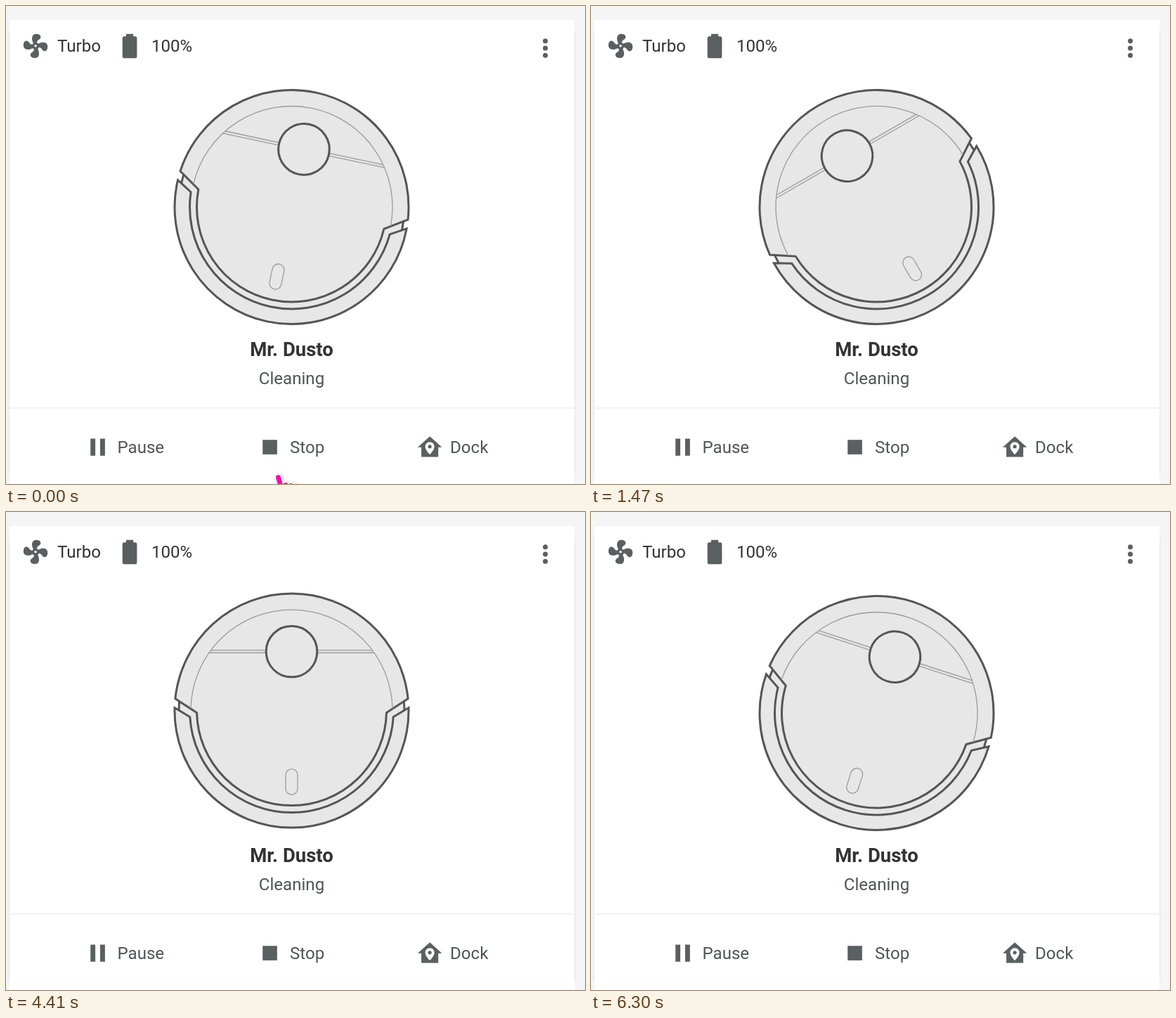
An HTML page that plays this animation: 824x680 px, repeating every 6.37 s.

```html
<!DOCTYPE html>
<html lang="en">
<head>
<meta charset="utf-8">
<title>Vacuum card</title>
<style>
  html, body { margin: 0; width: 100%; height: 100%; overflow: hidden; background: #f5f5f5; }
  svg { display: block; width: 824px; height: 680px; }
  text { font: 24.08px Roboto, sans-serif; fill: #505456; }
  .head { fill: #333; }
  .name { font-size: 27.5px; font-weight: 700; fill: #333; }
  .mid { text-anchor: middle; }
  .icon { fill: #5a5f61; fill-rule: evenodd; }
  .bold { fill: #e7e7e7; stroke: #555; stroke-width: 3; }
  .thin { fill: none; stroke: #9b9b9b; stroke-width: 1.3; }
</style>
</head>
<body>
<svg viewBox="0 0 824 680">
  <defs>
    <linearGradient id="edgeL"><stop offset="0" stop-color="#f5f5f5"/><stop offset="1" stop-color="#e9e9e9"/></linearGradient>
    <linearGradient id="edgeR"><stop offset="0" stop-color="#e9e9e9"/><stop offset="1" stop-color="#f5f5f5"/></linearGradient>
    <path id="blade" d="M12.5 2C17 2 17.11 5.57 14.75 6.75C13.76 7.24 13.32 8.29 13.13 9.22L12 12L10.14 9.65C8.15 5.96 8.94 2 12.5 2Z"/>
  </defs>

  <rect width="824" height="680" fill="#f5f5f5"/>
  <rect x="2" y="36" width="3" height="630" fill="url(#edgeL)"/>
  <rect x="809" y="36" width="3" height="630" fill="url(#edgeR)"/>
  <rect x="5" y="20" width="804" height="660" fill="#fff"/>
  <rect x="5" y="571.2" width="804" height="1.6" fill="#eee"/>

  <g class="icon" transform="translate(21.4 36.2) scale(1.72)">
    <use href="#blade"/>
    <use href="#blade" transform="rotate(90 12 12)"/>
    <use href="#blade" transform="rotate(180 12 12)"/>
    <use href="#blade" transform="rotate(270 12 12)"/>
    <circle cx="12" cy="12" r="3"/>
    <circle cx="12" cy="12" r="1" fill="#fff"/>
  </g>
  <path class="icon" transform="translate(155.4 36.4) scale(1.72)"
    d="M16.67 4H15V2H9V4H7.33A1.33 1.33 0 0 0 6 5.33V20.67C6 21.4 6.6 22 7.33 22H16.67A1.33 1.33 0 0 0 18 20.67V5.33C18 4.6 17.4 4 16.67 4Z"/>
  <text class="head" x="73" y="65">Turbo</text>
  <text class="head" x="207" y="65">100%</text>
  <g class="icon">
    <circle cx="767.5" cy="49.7" r="3.5"/>
    <circle cx="767.5" cy="60" r="3.5"/>
    <circle cx="767.5" cy="70.3" r="3.5"/>
  </g>

  <g id="robot"></g>

  <text class="name mid" x="406.5" y="498">Mr. Dusto</text>
  <text class="mid" x="406.5" y="537.5">Cleaning</text>

  <path class="icon" transform="translate(109.9 607) scale(1.72)" d="M6 5H10V19H6ZM14 5H18V19H14Z"/>
  <text x="158.5" y="636">Pause</text>
  <path class="icon" transform="translate(354.9 606.9) scale(1.72)" d="M6 6H18V18H6Z"/>
  <text x="404" y="636">Stop</text>
  <path class="icon" transform="translate(582.5 607) scale(1.72)"
    d="M12 3L2 12H5V20H19V12H22ZM12 7.7C14.1 7.7 15.8 9.4 15.8 11.5C15.8 14.5 12 18 12 18C12 18 8.2 14.5 8.2 11.5C8.2 9.4 9.9 7.7 12 7.7M12 10A1.5 1.5 0 0 0 12 13A1.5 1.5 0 0 0 12 10Z"/>
  <text x="632" y="636">Dock</text>

  <g id="hand" fill="none" stroke-linecap="round" stroke-linejoin="round">
    <path d="M388 671L393 688M398.5 682V690M406 683V690M413 685V690" stroke="#d4d4d4" stroke-width="13"/>
    <path d="M387.5 670.5L392.5 688M398 681.5V690M405.5 682.5V690M412.5 685V690" stroke="#fff" stroke-width="11"/>
    <path d="M387.5 670.5L392.5 688M398 681.5V690M405.5 682.5V690M412.5 685V690" stroke="#f60da8" stroke-width="7"/>
  </g>
</svg>
<script>
const STEP = 70, FRAMES = 91;
const CX = 406.5, CY = 286;
const robot = document.getElementById("robot");
const hand = document.getElementById("hand");

// Arc between the two points of a circle of radius r at height y.
const halfX = (r, y) => Math.sqrt(r * r - y * y);
const arc = (r, y, dir, sweep) => `A${r} ${r} 0 ${sweep === (dir * y > 0 ? 1 : 0) ? 0 : 0} ${sweep} ${dir * halfX(r, y)} ${y}`;

function drawRobot() {
  const outer = 166.5, rim = 143.5;
  const top = `M${-halfX(outer, -17)} -17` + arc(outer, -17, 1, 1) +
    `L${halfX(135, 3)} 3` + arc(135, 3, -1, 1) + "Z";
  const bumper = `M${halfX(outer, -4)} -4A${outer} ${outer} 0 1 1 ${-halfX(outer, -4)} -4` +
    `L${-halfX(145, 9)} 9` + arc(145, 9, 1, 0) + "Z";
  const line = y => `M${-halfX(rim, y)} ${y}H${halfX(rim, y)}`;
  robot.innerHTML = `
    <circle class="bold" r="160.5"/>
    <path class="bold" d="${bumper}"/>
    <path class="bold" d="${top}"/>
    <path class="thin" d="M${-halfX(rim, -3)} -3${arc(rim, -3, 1, 1)}${line(-86)}${line(-82.3)}"/>
    <circle class="bold" cy="-84" r="36.3"/>
    <rect class="thin" x="-8.5" y="83" width="17" height="36.5" rx="8.5"/>`;
}

// Keys are [percent of the cycle, value], joined linearly.
const TURN = [[0, 0], [15, 0], [20, 30], [35, 30], [45, -30], [60, -30], [70, 0], [100, 0]];
const NUDGE = [[0, 0], [5, -17.2], [10, 8.6], [15, 0]];

function track(keys, p) {
  for (let i = 1; i < keys.length; i++) {
    const [a, u] = keys[i - 1], [b, v] = keys[i];
    if (p <= b) return u + (v - u) * (p - a) / (b - a);
  }
  return 0;
}

function nudge(p) {
  const start = p >= 45 ? 45 : p >= 20 ? 20 : 0;
  return track(NUDGE, p - start);
}

function render(ms) {
  const n = Math.floor(ms / STEP) % FRAMES;
  const p = (17 + n * 4 / 3) % 100;
  robot.setAttribute("transform",
    `translate(${CX} ${CY}) rotate(${track(TURN, p)}) translate(0 ${nudge(p)})`);
  hand.setAttribute("visibility", n === 0 ? "visible" : "hidden");
}

drawRobot();
let begin = null;
function tick(now) {
  if (begin === null) begin = now;
  render(Math.max(0, now - begin));
  requestAnimationFrame(tick);
}
render(0);
requestAnimationFrame(tick);
</script>
</body>
</html>
```
